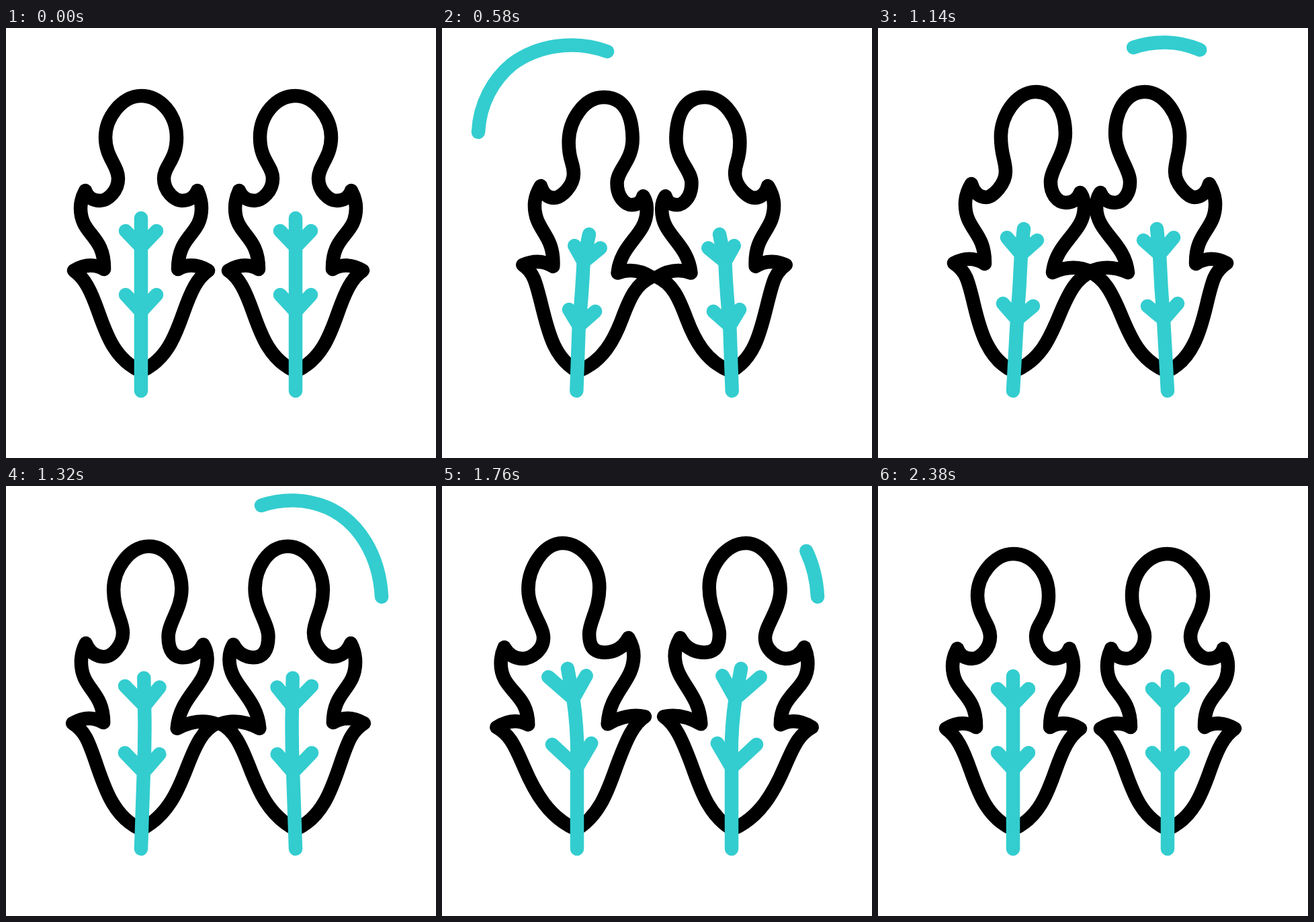
An HTML page without scripts for the animation above (2.6 s loop, 640 by 640 pixels).

```html
<!DOCTYPE html>
<html lang="en">
<head>
<meta charset="utf-8">
<title>Swaying leaves</title>
<style>
html, body { margin: 0; height: 100%; overflow: hidden; background: #fff; }
svg { display: block; width: 100vw; height: 100vh; }
path { fill: none; stroke: #33cdcf; stroke-width: 20.5; stroke-linecap: round; stroke-linejoin: round; animation: 2.6s cubic-bezier(.37, 0, .63, 1) infinite; }
.edge { stroke: #000; animation-name: edge; }
.vein { animation-name: vein; }
.gust { stroke-dasharray: 100 200; stroke-dashoffset: 102; animation-timing-function: linear; }
.left { animation-name: left; }
.right { animation-name: right; }
.spark { animation-name: spark; }

/* rest, lean in, swing back, stretch, lean out, rest */
@keyframes edge {
  0%, 8.462%, 91.538%, 100% {
    d: path("M201 511C163 494 150 458 138 424S117 372 101 361Q125 347 146 359C147 307 111 309 111 268Q111 255 118 242C121 252 129 257 140 257S167 243 167 224S148 192 148 163S172 101 201 101S254 129 254 163S235 205 235 224S251 257 262 257S281 252 285 242Q291 255 291 268C291 309 256 307 256 359Q277 347 301 361C285 372 276 390 264 424S239 494 201 511Z");
  }
  30.769% {
    d: path("M203 511C169 492 162 450 154 412S146 360 129 349Q154 340 174 353C177 305 150 300 150 262Q150 248 160 232C163 242 169 251 179 251S209 232 209 214S206 200 207 170S228 104 259 104S296 130 297 164S272 213 272 234S282 266 291 266S304 262 306 254Q312 262 311 272C311 309 271 325 264 367Q291 359 316 375C291 385 282 405 270 436S240 497 203 511Z");
    animation-timing-function: cubic-bezier(.35, 0, .7, .45);
  }
  43.846% {
    d: path("M202 511C164 494 152 450 143 412S131 362 113 350Q137 337 159 351C160 303 130 301 130 262Q130 247 139 232C143 245 151 252 161 252S190 232 190 214S183 190 183 161S205 95 235 95S279 127 279 157S257 210 257 229S268 260 279 260S297 255 301 245Q307 253 307 267C307 305 265 318 260 364Q291 350 317 363C296 372 285 392 271 425S244 494 202 511Z");
    animation-timing-function: linear;
  }
  56.923% {
    d: path("M200 511C160 494 144 455 128 418S105 367 87 356Q111 341 133 353C132 306 96 304 96 262Q96 248 101 236C107 248 118 256 133 256S160 240 160 222S140 180 140 149S164 85 193 85S245 118 246 148S228 197 228 220S234 251 250 251S280 240 287 228Q293 239 293 251C293 290 253 307 250 358Q282 340 308 346C291 355 281 377 269 411S239 488 200 511Z");
    animation-timing-function: cubic-bezier(.3, .4, .6, 1);
  }
  63.077% {
    d: path("M200 511C159 494 137 455 121 418S98 369 80 359Q105 343 127 355C127 307 86 305 86 264Q86 251 91 240C97 251 107 257 119 257S150 245 150 226S127 184 127 153S149 84 178 84S233 117 233 150S218 201 218 220S224 247 241 247S270 238 277 225Q285 239 285 251C285 291 249 305 246 354Q276 337 302 342C285 353 275 376 262 410S238 488 200 511Z");
  }
}
@keyframes vein {
  0%, 8.462%, 91.538%, 100% {
    d: path("M201 540L201 422Q201 374 201 326L201 283M178 302L201 326L224 302M178 397L201 422L224 397");
  }
  30.769% {
    d: path("M200 540L205 453Q212 404 215 358L227 318M206 334L215 358L241 339M194 429L205 453L230 433");
    animation-timing-function: cubic-bezier(.35, 0, .7, .45);
  }
  43.846% {
    d: path("M201 540L207 434Q211 385 213 337L217 299M192 312L213 337L237 316M186 410L207 434L231 414");
    animation-timing-function: linear;
  }
  56.923% {
    d: path("M201 540L203 419Q204 370 200 319L195 274M164 285L200 319L221 285M169 386L203 419L226 386");
    animation-timing-function: cubic-bezier(.3, .4, .6, 1);
  }
  63.077% {
    d: path("M201 540L201 419Q203 368 195 316L186 271M157 283L195 316L214 281M163 384L201 419L222 382");
  }
}

/* each gust draws itself, holds, then drains from its start */
@keyframes left {
  0%, 8.462% { stroke-dashoffset: 102; }
  19.231%, 23.846% { stroke-dashoffset: 0; }
  34.615%, 100% { stroke-dashoffset: -102; }
}
@keyframes right {
  0%, 39.615% { stroke-dashoffset: 102; }
  50.385%, 60% { stroke-dashoffset: 0; }
  70.769%, 100% { stroke-dashoffset: -102; }
}
@keyframes spark {
  0%, 77.2% { stroke-dashoffset: 102; }
  84.615% { stroke-dashoffset: 0; }
  91.538%, 100% { stroke-dashoffset: -102; }
}
</style>
</head>
<body>
<svg viewBox="0 0 640 640">
  <g>
    <path class="edge"/>
    <path class="vein"/>
  </g>
  <g transform="translate(632) scale(-1 1)">
    <path class="edge"/>
    <path class="vein"/>
  </g>
  <path class="gust left" pathLength="100" d="M246 35C195 16 140 27 104 54C76 77 56 113 54 155"/>
  <path class="gust right" pathLength="100" d="M380 29C412 18 447 19 478 32C526 53 556 105 559 165"/>
  <path class="gust spark" pathLength="100" d="M268 91L260 47"/>
  <path class="gust spark" pathLength="100" d="M311 84V30"/>
  <path class="gust spark" pathLength="100" d="M356 92L364 48"/>
</svg>
</body>
</html>
```
